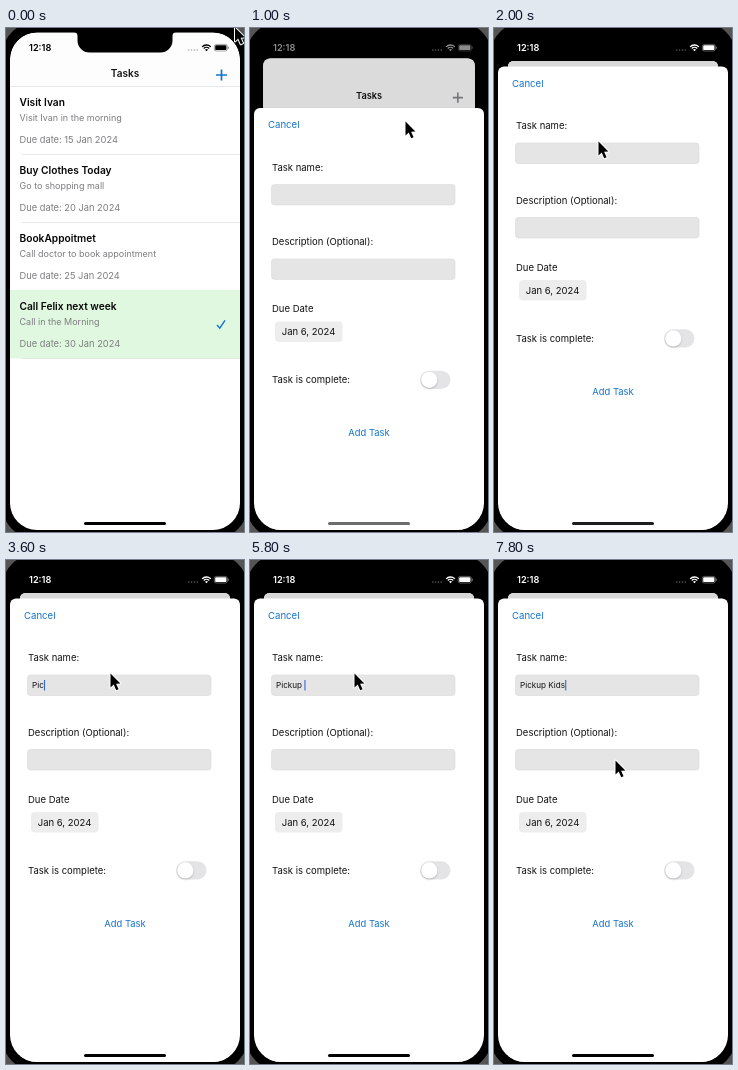
Animation of 238x504 px, one loop 8000 ms. Source, as an HTML page with a canvas:

```html
<!DOCTYPE html>
<html lang="en">
<head>
<meta charset="utf-8">
<title>Tasks</title>
<style>
html, body { margin: 0; width: 100%; height: 100%; overflow: hidden; background: #000; }
canvas { display: block; width: 238px; height: 504px; }
</style>
</head>
<body>
<canvas id="stage"></canvas>
<script>
const W = 238, H = 504, LOOP = 8000, STEP = 200;
const BLUE = '#1273cc';
const canvas = document.getElementById('stage');
const ctx = canvas.getContext('2d');
const dpr = window.devicePixelRatio || 1;
canvas.width = W * dpr;
canvas.height = H * dpr;

const tasks = [
  ['Visit Ivan', 'Visit Ivan in the morning', '15'],
  ['Buy Clothes Today', 'Go to shopping mall', '20'],
  ['BookAppoitmet', 'Call doctor to book appointment', '25'],
  ['Call Felix next week', 'Call in the Morning', '30']
];

// Each key is [time, ...values]; values run linearly between keys.
const sheetKeys = [[600, 0], [800, 0.144], [1000, 0.911], [1200, 0.997], [1400, 1]];
const statusKeys = [[800, 0], [1000, 140], [1200, 255]];
const homeKeys = [[600, 0], [800, 105], [1400, 115], [2200, 0]];
const pointerKeys = [
  [0, 228.5, -1], [200, 227.5, 4], [400, 223, 24], [600, 217.5, 42], [800, 217, 43],
  [1000, 155, 93], [1200, 108, 114], [1400, 104, 113],
  [7000, 104, 113], [7200, 106, 123], [7400, 113, 158], [7600, 120, 194], [7800, 121, 200]
];
const caretKeys = [
  [2400, 0], [2600, 1], [4600, 1], [4800, 0.5], [5000, 0], [5200, 0], [5400, 0.5], [5600, 1]
];
const typed = 'Pickup Kids';
const typeTimes = [3200, 3400, 3600, 3800, 4000, 4200, 4400, 6000, 6200, 6600, 6800];

function track(keys, t) {
  const next = keys.findIndex(k => k[0] > t);
  if (next === 0) return keys[0].slice(1);
  if (next < 0) return keys[keys.length - 1].slice(1);
  const a = keys[next - 1], b = keys[next];
  const u = (t - a[0]) / (b[0] - a[0]);
  return a.slice(1).map((v, i) => v + (b[i + 1] - v) * u);
}

function grey(v) {
  return `rgb(${v},${v},${v})`;
}

function box(x, y, w, h, r, fill) {
  ctx.beginPath();
  ctx.roundRect(x, y, w, h, r);
  ctx.fillStyle = fill;
  ctx.fill();
}

function text(str, x, y, size, color = '#111', weight = 400, align = 'left') {
  ctx.font = `${weight} ${size}px Inter, sans-serif`;
  ctx.fillStyle = color;
  ctx.textAlign = align;
  ctx.fillText(str, x, y);
}

function line(points, color, width) {
  ctx.beginPath();
  points.forEach(p => ctx.lineTo(p[0], p[1]));
  ctx.strokeStyle = color;
  ctx.lineWidth = width;
  ctx.stroke();
}

function drawList(t, p) {
  const radius = 27 - 21 * p;
  const scale = 1 - 0.087 * p;
  ctx.save();
  ctx.translate(119, 28.9 * p);
  ctx.scale(scale, scale);
  ctx.translate(-119, 0);
  ctx.beginPath();
  ctx.roundRect(4, 4.5, 230, 520, [radius, radius, 0, 0]);
  ctx.clip();
  box(4, 4, 230, 521, 0, '#fff');
  box(4, 4, 230, 54, 0, '#fdfdfd');
  text('Tasks', 119, 49, 10, '#111', 600, 'center');

  ctx.globalAlpha = t === 800 ? 0.3 : 1;
  const plus = p > 0.5 ? '#85858a' : BLUE;
  line([[210, 47], [221, 47]], plus, 1.7);
  line([[215.5, 41.5], [215.5, 52.5]], plus, 1.7);
  ctx.globalAlpha = 1;

  line([[4, 58.5], [234, 58.5]], '#e3e3e4', 0.8);
  tasks.forEach(([name, note, day], i) => {
    const y = 58 + 68 * i;
    if (i === 3) box(4, y, 230, 68.5, 0, '#e0f8e0');
    text(name, 13.5, y + 20, 10.2, '#050505', 600);
    text(note, 13.5, y + 34.5, 9, '#7d7d80');
    text(`Due date: ${day} Jan 2024`, 13.5, y + 56.5, 9.3, '#7d7d80');
    line([[16, y + 68.5], [234, y + 68.5]], '#e1e1e3', 0.8);
  });
  line([[211, 297], [213.8, 300.2], [219, 292.3]], BLUE, 1.4);
  ctx.fillStyle = `rgba(0,0,0,${0.145 * p})`;
  ctx.fillRect(4, 4, 230, 521);
  ctx.restore();
}

function field(y) {
  box(21.5, y, 183.5, 20.5, 3, '#e5e5e6');
  ctx.strokeStyle = '#d9d9da';
  ctx.lineWidth = 0.6;
  ctx.stroke();
}

function drawSheet(t, p) {
  ctx.save();
  ctx.translate(0, 504 - 465.5 * p);
  box(4, 0, 230, 480, [6, 6, 0, 0], '#fff');
  text('Cancel', 18, 20, 9.6, BLUE);
  text('Task name:', 22, 62.8, 9.5);
  field(76.5);
  text('Description (Optional):', 22, 137, 9.5);
  field(151);
  text('Due Date', 22, 204.5, 9.5);
  box(25, 213.5, 67.5, 20.5, 4, '#ededee');
  text('Jan 6, 2024', 58.5, 227.5, 9.5, '#111', 400, 'center');
  text('Task is complete:', 22, 275.2, 9.5);

  box(170, 262.7, 30.5, 18.3, 9.2, '#e4e4e6');
  ctx.save();
  ctx.shadowColor = 'rgba(0,0,0,.22)';
  ctx.shadowBlur = 2 * dpr;
  ctx.shadowOffsetY = dpr;
  box(171.2, 263.8, 16.2, 16.2, 8.1, '#fff');
  ctx.restore();
  text('Add Task', 119, 328, 9.4, BLUE, 400, 'center');

  const shown = typed.slice(0, typeTimes.filter(at => at <= t).length);
  text(shown, 26, 89.7, 8.1);
  ctx.globalAlpha = track(caretKeys, t)[0];
  ctx.fillStyle = '#3568d4';
  ctx.fillRect(26.2 + ctx.measureText(shown).width, 81.5, 1.1, 10.5);
  ctx.restore();
}

function drawStatus(t) {
  const v = track(statusKeys, t)[0];
  const color = grey(v);
  text('12:18', 23, 23.2, 9.2, color, 600);
  for (let i = 0; i < 4; i++) box(182 + 2.8 * i, 21.3, 1.6, 1.6, 0.8, v > 100 ? '#555' : '#b0b0b0');

  ctx.strokeStyle = color;
  ctx.lineWidth = 1.3;
  for (const r of [3.7, 6]) {
    ctx.beginPath();
    ctx.arc(200.5, 23, r, -Math.PI * 0.76, -Math.PI * 0.24);
    ctx.stroke();
  }
  ctx.beginPath();
  ctx.moveTo(200.5, 23.2);
  ctx.arc(200.5, 23, 2, -Math.PI * 0.76, -Math.PI * 0.24);
  ctx.fillStyle = color;
  ctx.fill();

  ctx.beginPath();
  ctx.roundRect(208.3, 16.4, 13, 6.6, 2);
  ctx.globalAlpha = 0.5;
  ctx.lineWidth = 0.7;
  ctx.stroke();
  box(221.9, 18.6, 0.9, 2.2, 0.4, color);
  ctx.globalAlpha = 1;
  box(209.2, 17.3, 11.2, 4.8, 1.2, color);
}

function drawNotch() {
  ctx.beginPath();
  ctx.moveTo(68, 4);
  ctx.quadraticCurveTo(71.5, 4.5, 71.5, 8);
  ctx.lineTo(71.5, 12);
  ctx.arcTo(71.5, 24.5, 84, 24.5, 12);
  ctx.lineTo(154, 24.5);
  ctx.arcTo(166.5, 24.5, 166.5, 12, 12);
  ctx.lineTo(166.5, 8);
  ctx.quadraticCurveTo(166.5, 4.5, 170, 4);
  ctx.closePath();
  ctx.fillStyle = '#000';
  ctx.fill();
}

function drawPointer(t) {
  const [x, y] = track(pointerKeys, t);
  ctx.save();
  ctx.translate(x, y);
  ctx.beginPath();
  [[0.5, 0.5], [0.5, 14.5], [3.7, 11.6], [6.2, 17.3], [8.6, 16.2], [6.1, 10.7], [10.4, 10.5]]
    .forEach(p => ctx.lineTo(p[0], p[1]));
  ctx.closePath();
  ctx.lineJoin = 'round';
  ctx.strokeStyle = '#fff';
  ctx.lineWidth = 2;
  ctx.stroke();
  ctx.fillStyle = '#000';
  ctx.fill();
  ctx.restore();
}

function draw(now) {
  const t = Math.floor((now % LOOP) / STEP) * STEP;
  const p = track(sheetKeys, t)[0];
  ctx.setTransform(dpr, 0, 0, dpr, 0, 0);
  box(0, 0, W, H, 0, '#555');
  box(-4, -6, 246, 517, 34, '#000');

  ctx.save();
  ctx.beginPath();
  ctx.roundRect(4, 4.5, 230, 497.5, 27);
  ctx.clip();
  box(4, 4, 230, 499, 0, '#000');
  drawList(t, p);
  if (p > 0) drawSheet(t, p);
  ctx.restore();

  drawNotch();
  drawStatus(t);
  box(78, 494, 82, 3, 1.5, grey(track(homeKeys, t)[0]));
  drawPointer(t);
}

function loop() {
  draw(performance.now());
  requestAnimationFrame(loop);
}
loop();
</script>
</body>
</html>
```
